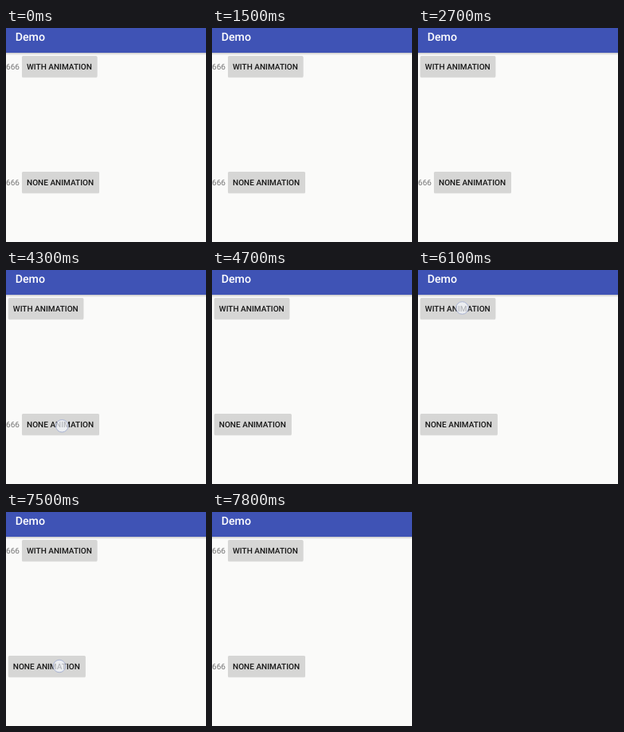
Animation, 251 px wide and 268 px high, one loop 8.9 s. Source, as an HTML page:

```html
<!DOCTYPE html>
<html lang="en">
<head>
<meta charset="utf-8">
<title>Demo</title>
<style>
  html, body { margin: 0; width: 100%; height: 100%; overflow: hidden; background: #fafaf9; }
  svg { display: block; width: 251px; height: 268px; font-family: Roboto, sans-serif; text-rendering: geometricPrecision; }
  .title { font-size: 14.2px; font-weight: 500; fill: #fff; }
  .label { font-size: 10.05px; fill: #757575; }
  .button rect { fill: #d6d6d5; }
  .button .shade { fill: #000; opacity: .1; filter: blur(.6px); }
  .button text { font-size: 10.05px; font-weight: 500; fill: #161616; }
  #touch { fill: #f4f6fc; fill-opacity: .72; stroke: #a9b3d3; stroke-width: 1; }
</style>
</head>
<body>
<svg viewBox="0 0 251 268">
  <defs>
    <linearGradient id="drop" x2="0" y2="1">
      <stop offset="0" stop-color="#000" stop-opacity=".2"/>
      <stop offset="1" stop-color="#000" stop-opacity="0"/>
    </linearGradient>
  </defs>
  <rect width="251" height="268" fill="#fafaf9"/>
  <rect y="31" width="251" height="3" fill="url(#drop)"/>
  <rect width="251" height="31" fill="#3f53b5"/>
  <text class="title" x="11.7" y="16.2">Demo</text>

  <text class="label" id="topLabel" x="0" y="52.2">666</text>
  <g class="button" id="topButton">
    <rect class="shade" x="20" y="35.6" width="94.5" height="26.6" rx="1.5"/>
    <rect x="20" y="35" width="94.5" height="26.6" rx="1.5"/>
    <text x="26" y="52">WITH ANIMATION</text>
  </g>

  <text class="label" id="lowLabel" x="0" y="196.9">666</text>
  <g class="button" id="lowButton">
    <rect class="shade" x="20" y="180.6" width="97" height="26.6" rx="1.5"/>
    <rect x="20" y="180" width="97" height="26.6" rx="1.5"/>
    <text x="26" y="196.8">NONE ANIMATION</text>
  </g>

  <circle id="touch" r="7.8"/>
</svg>
<script>
  const LOOP = 8900, STEP = 100, SPAN = 300, SHIFT = -17.2;
  const taps = [
    { at: 2000, x: 58, y: 48 },
    { at: 4300, x: 70.3, y: 195.3 },
    { at: 6100, x: 55.5, y: 47.5 },
    { at: 7500, x: 67, y: 193 }
  ];
  const el = id => document.getElementById(id);
  const [topLabel, topButton, lowLabel, lowButton, touch] =
    ['topLabel', 'topButton', 'lowLabel', 'lowButton', 'touch'].map(el);

  const progress = (t, start) => Math.min(1, Math.max(0, (t - start) / SPAN));
  const decelerate = p => 1 - (1 - p) ** 2;
  const smooth = p => (1 - Math.cos(Math.PI * p)) / 2;

  function place(label, button, alpha, shift) {
    label.setAttribute('opacity', alpha);
    button.setAttribute('transform', `translate(${shift * SHIFT} 0)`);
  }

  function draw(t) {
    // Hide: fade, then slide. Show: slide, then fade.
    const fade = 1 - smooth(progress(t, 2100)) + smooth(progress(t, 6400));
    const slide = decelerate(progress(t, 2400)) - decelerate(progress(t, 6100));
    place(topLabel, topButton, fade, slide);

    const hidden = t >= 4400 && t < 7600 ? 1 : 0;
    place(lowLabel, lowButton, 1 - hidden, hidden);

    const tap = taps.find(p => t >= p.at && t < p.at + STEP);
    touch.setAttribute('visibility', tap ? 'visible' : 'hidden');
    if (tap) touch.setAttribute('transform', `translate(${tap.x} ${tap.y})`);
  }

  function tick() {
    const t = performance.now() % LOOP;
    draw(Math.floor(t / STEP) * STEP);
    requestAnimationFrame(tick);
  }
  tick();
</script>
</body>
</html>
```
